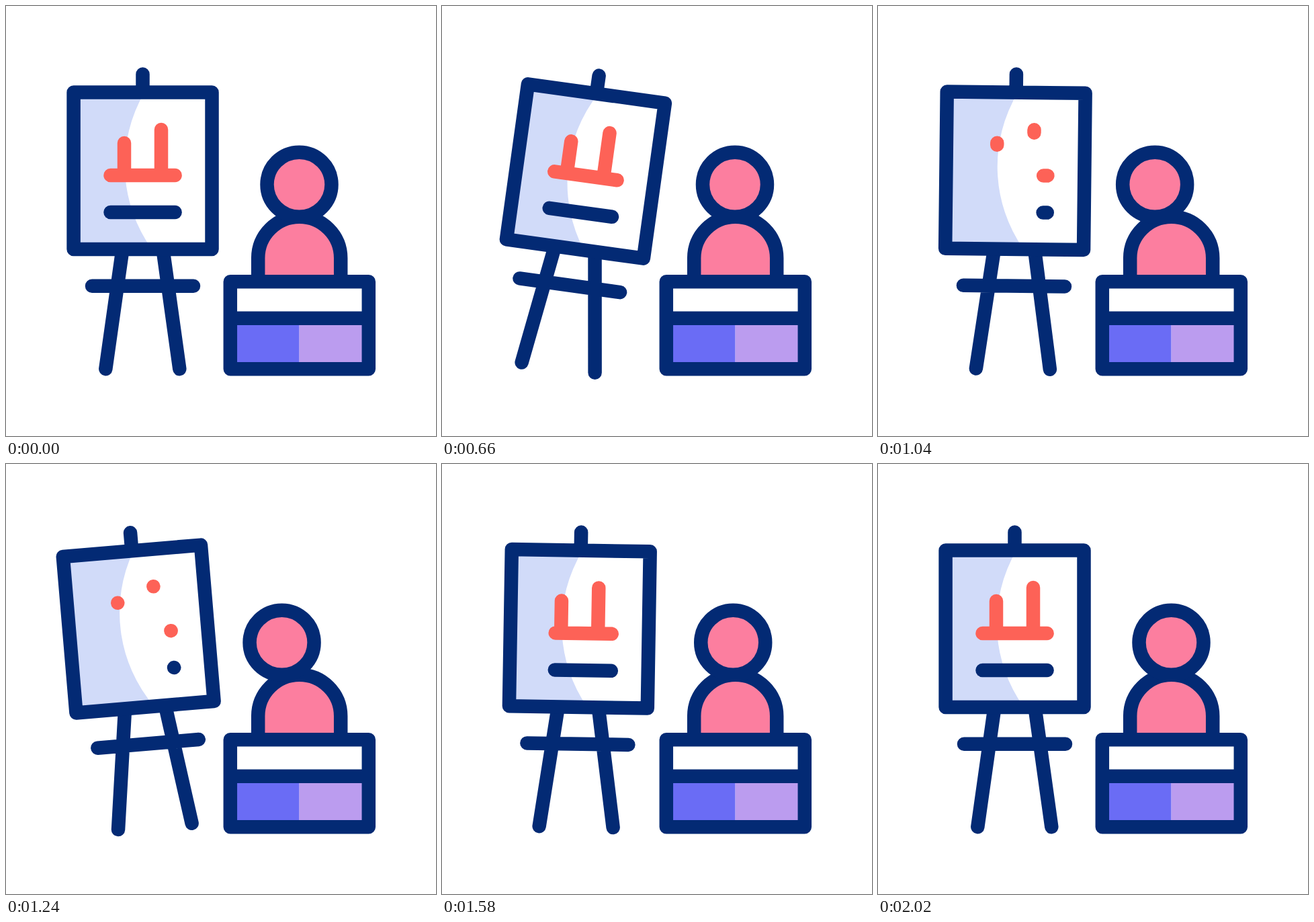
An HTML page that plays this animation: 640x640 px, repeating every 2400 ms.

```html
<!DOCTYPE html>
<html lang="en">
<head>
<meta charset="utf-8">
<title>Presentation</title>
<style>
  html, body { margin: 0; width: 100%; height: 100%; overflow: hidden; background: #fff; }
  svg { display: block; width: 100vw; height: 100vh; }
  .ink, .red { fill: none; stroke-width: 20.5; stroke-linecap: round; stroke-linejoin: round; }
  .ink { stroke: #032a74; }
  .red { stroke: #fd6257; }
  .skin { fill: #fc7e9f; }
</style>
</head>
<body>
<svg viewBox="0 0 640 640">
  <g id="easel">
    <path class="ink" d="M173.5 362L148.3 540.2M233.5 362L258.3 540.2M128 416.7H279"/>
    <path fill="#fff" d="M100.6 128.6H306.5V361.9H100.6Z"/>
    <path fill="#d1dbf9" d="M100.6 128.6H206A215 215 0 0 0 217 361.9H100.6Z"/>
    <path class="ink" d="M203.5 101.5V128.6M100.6 128.6H306.5V361.9H100.6Z"/>
    <path class="red" id="chart"/>
    <path class="ink" id="caption"/>
  </g>
  <path class="ink skin" d="M375.2 410.3V375.3A61.5 61.5 0 0 1 498.2 375.3V410.3"/>
  <circle class="ink skin" id="head" cx="436.5" cy="265.8" r="48"/>
  <path fill="#fff" d="M333.8 410.3H539.8V464.8H333.8Z"/>
  <path fill="#6a6cf5" d="M333.8 464.8H436.6V540.3H333.8Z"/>
  <path fill="#bb9cef" d="M436.6 464.8H539.8V540.3H436.6Z"/>
  <path class="ink" d="M333.8 410.3H539.8V540.3H333.8ZM333.8 464.8H539.8"/>
</svg>
<script>
const LOOP = 2400, STEP = 20;
const START = 400, SWING = 400, MID = 1200, REACH = 690;
const ANGLES = [0, 11, -5, 1, 0];
const byId = id => document.getElementById(id);
const easel = byId('easel'), chart = byId('chart'), caption = byId('caption'), head = byId('head');

const clamp = x => Math.min(1, Math.max(0, x));
const smooth = x => x * x * (3 - 2 * x);

// Cubic bezier easing with flat ends
function bezier(x, x1, x2) {
  let lo = 0, hi = 1;
  for (let i = 0; i < 30; i++) {
    const t = (lo + hi) / 2, r = 1 - t;
    if (3 * r * r * t * x1 + 3 * r * t * t * x2 + t * t * t < x) lo = t;
    else hi = t;
  }
  return smooth(lo);
}

function tilt(t) {
  const k = (t - START) / SWING;
  if (k <= 0 || k >= ANGLES.length - 1) return 0;
  const i = Math.floor(k);
  return ANGLES[i] + (ANGLES[i + 1] - ANGLES[i]) * smooth(k - i);
}

// 0 at rest, 1 when the head is far left and the lines are gone
function shift(t) {
  const x = clamp(1 - Math.abs(t - MID) / REACH);
  return x === 0 ? 0 : x === 1 ? 1 : bezier(x, 1, 0.31);
}

function draw(t) {
  const s = shift(t), left = 1 - s;
  const bar = (x, y) => `M${x} ${y}V${y + (252 - y) * left}`;
  const rule = y => `M251.6 ${y}H${251.6 - 96.1 * left}`;
  easel.setAttribute('transform', `rotate(${tilt(t)} 203.5 320.6)`);
  chart.setAttribute('d', bar(176, 204) + bar(231, 184) + rule(252));
  caption.setAttribute('d', rule(307));
  head.setAttribute('cx', 436.5 - 26 * s);
}

const begin = performance.now();
function tick() {
  const t = (performance.now() - begin) % LOOP;
  draw(Math.floor(t / STEP) * STEP);
  requestAnimationFrame(tick);
}
draw(0);
requestAnimationFrame(tick);
</script>
</body>
</html>
```
